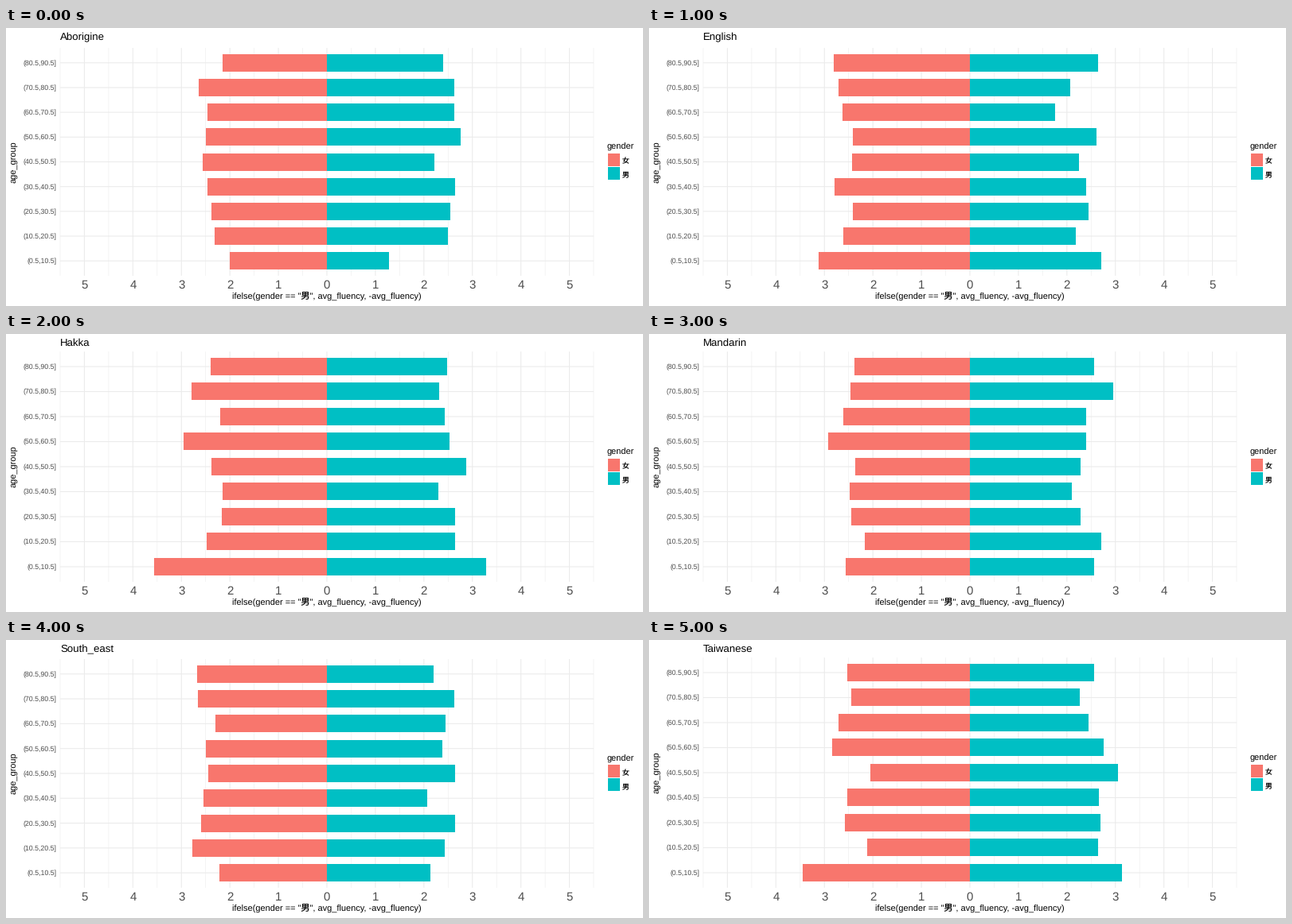
Recreate the animation shown at these times as a matplotlib script. Size 800 by 350 pixels, loop 6000 ms.

```python
import matplotlib.pyplot as plt
from matplotlib.animation import FuncAnimation
from matplotlib.patches import Rectangle

W, H, DPI = 800, 350, 100
PT = 72 / DPI
LEFT, RIGHT, BOTTOM = 68, 738, 311.9
MID = (LEFT + RIGHT) / 2
UNIT = (RIGHT - LEFT) / 11
PINK, TEAL = "#F8766D", "#00BFC4"
GRID, GREY = "#EBEBEB", "#4D4D4D"

# Title, panel top, female and male bar lengths in pixels (oldest group first)
PAGES = [
    ("Aborigine", 25.1,
     [131, 161, 150, 152, 156, 150, 145, 141, 122],
     [146, 160, 160, 168, 135, 161, 155, 152, 78]),
    ("English", 25.1,
     [171, 165, 160, 147, 148, 170, 147, 159, 190],
     [161, 126, 107, 159, 137, 146, 149, 133, 165]),
    ("Hakka", 22.1,
     [146, 170, 134, 180, 145, 131, 132, 151, 217],
     [151, 141, 148, 154, 175, 140, 161, 161, 200]),
    ("Mandarin", 22.1,
     [145, 150, 159, 178, 144, 151, 149, 132, 156],
     [156, 180, 146, 146, 139, 128, 139, 165, 156]),
    ("South_east", 24.0,
     [163, 162, 140, 152, 149, 155, 158, 169, 135],
     [134, 160, 149, 145, 161, 126, 161, 148, 130]),
    ("Taiwanese", 22.1,
     [154, 149, 165, 173, 125, 154, 157, 129, 210],
     [156, 138, 149, 168, 186, 162, 164, 161, 191]),
]

plt.rcParams["font.family"] = ["Liberation Sans", "Noto Sans CJK JP"]
plt.rcParams["text.hinting"] = "no_hinting"

fig = plt.figure(figsize=(W / DPI, H / DPI), dpi=DPI, facecolor="white")
ax = fig.add_axes([0, 0, 1, 1])
ax.set_xlim(0, W)
ax.set_ylim(H, 0)
ax.axis("off")


def text(x, y, s, px, color="black", **kw):
    return ax.text(x, y, s, fontsize=px * PT, color=color,
                   va="baseline", **kw)


def line(xs, ys, px):
    return ax.plot(xs, ys, color=GRID, lw=px * PT, snap=False,
                   solid_capstyle="butt", zorder=1)[0]


def rect(color):
    return ax.add_patch(Rectangle((0, 0), 0, 0, fc=color, lw=0,
                                  antialiased=False, zorder=2))


def pixel(v):
    return int(v + 0.5)


columns = [line([MID + k * UNIT / 2] * 2, [0, BOTTOM], 0.53 if k % 2 else 1.07)
           for k in range(-11, 12)]
for k in range(-5, 6):
    text(MID + k * UNIT, 328.3, str(abs(k)), 15, GREY, ha="center")
text(402.5, 342, 'ifelse(gender == "男", avg_fluency, -avg_fluency)', 11,
     ha="center")

title = text(LEFT, 15, "", 13.2)
y_name = text(13, 0, "age_group", 11, ha="center", rotation=90,
              rotation_mode="anchor")
rows = [line([LEFT, RIGHT], [0, 0], 1.07) for _ in range(9)]
labels = [text(63.8, 0, f"({80 - 10 * i}.5,{90 - 10 * i}.5]", 8.8, GREY,
               ha="right") for i in range(9)]
women = [rect(PINK) for _ in range(9)]
men = [rect(TEAL) for _ in range(9)]

key_title = text(755, 0, "gender", 11)
keys = [rect(PINK), rect(TEAL)]
key_names = [text(773.7, 0, s, 8.8) for s in "女男"]


def draw(i):
    name, top, left, right = PAGES[i]
    step = (BOTTOM - top) / 9.2
    mid = (top + BOTTOM) / 2
    title.set_text(name)
    y_name.set_y(mid)
    for col in columns:
        col.set_ydata([top, BOTTOM])
    for r in range(9):
        y = top + (r + 0.6) * step
        rows[r].set_ydata([y, y])
        labels[r].set_y(y + 3.1)
        y0 = pixel(y - 0.35 * step)
        women[r].set_bounds(MID - left[r], y0, left[r], 22)
        men[r].set_bounds(MID, y0, right[r], 22)
    key_title.set_y(mid - 15.5)
    for k in range(2):
        keys[k].set_bounds(756, pixel(mid - 10.5) + 17 * k, 15, 16)
        key_names[k].set_y(mid + 1.8 + 17.28 * k)
    return []


anim = FuncAnimation(fig, draw, frames=len(PAGES), init_func=lambda: draw(0),
                     interval=1000, repeat=True, repeat_delay=0)
plt.show()
```
